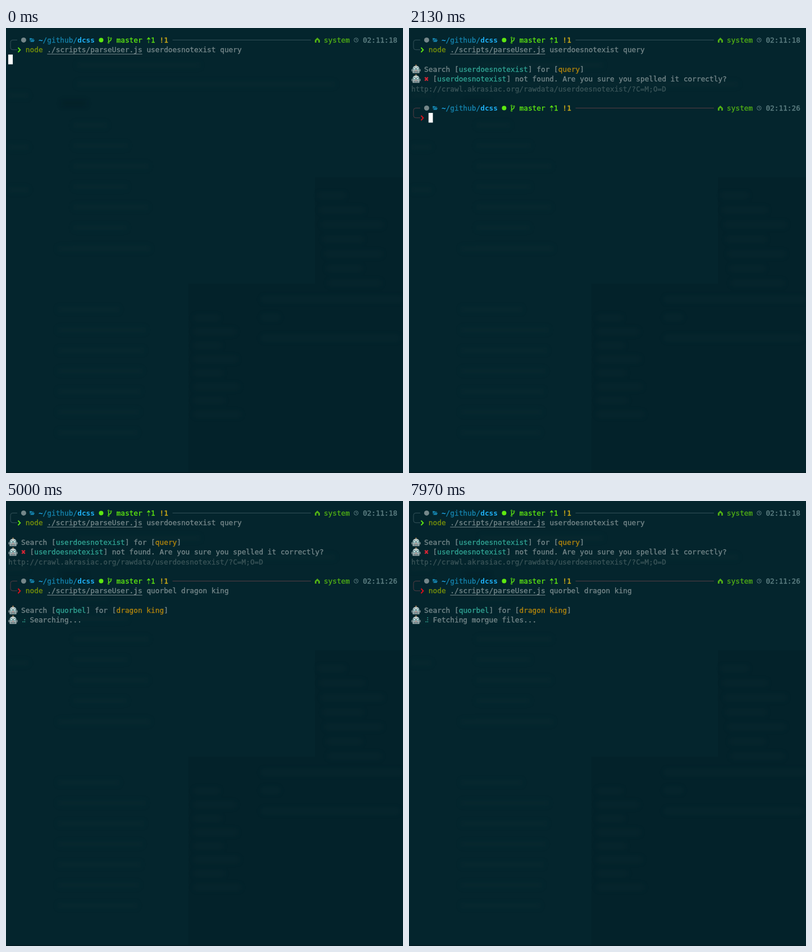
Recreate the animation shown at these times as an HTML page. Size 707 by 792 pixels, loop 8000 ms.

```html
<!DOCTYPE html>
<html lang="en">
<head>
<meta charset="utf-8">
<title>Terminal session</title>
<style>
  html, body { margin: 0; width: 100%; height: 100%; overflow: hidden; background: #04252d; }
  svg { display: block; width: 100%; height: 100%; }
  text { font: 12.79px "DejaVu Sans Mono", "Liberation Mono", monospace; stroke-width: .35; white-space: pre; }
  .bold { font-weight: bold; stroke-width: 0; }
</style>
</head>
<body>
<svg id="stage" viewBox="0 0 707 792" xmlns="http://www.w3.org/2000/svg">
  <defs>
    <filter id="soft" x="-20%" y="-20%" width="140%" height="140%"><feGaussianBlur stdDeviation="5"/></filter>
    <g id="robot">
      <path d="M-7.3 0V4M7.3 0V4" stroke="#8d9da0" stroke-width="1.4"/>
      <path d="M0 -8V-5" stroke="#b98a55" stroke-width="2"/>
      <path d="M-6 7V-1Q-5.5 -6 0 -6Q5.5 -6 6 -1V7Z" fill="#a9b9ba"/>
      <path d="M-5 -2Q-3.5 -5 0 -5Q3.5 -5 5 -2Z" fill="#cad4d3"/>
      <g fill="#d9f1ee" stroke="#3e7379"><circle cx="-2.9" cy="-.6" r="2"/><circle cx="2.9" cy="-.6" r="2"/></g>
      <path d="M-1 3L0 1.2L1 3Z" fill="#c34a43"/>
      <path d="M-4 4.8H4" stroke="#43565c" stroke-width="2"/>
      <path d="M-2 4V5.6M0 4V5.6M2 4V5.6" stroke="#c8d3d3" stroke-width=".8"/>
    </g>
  </defs>
</svg>
<script>
const LOOP = 8000, CELL = 7.7, LINE = 17.3;
const GRAY = '#75878a', DIM = '#3a5458', CYAN = '#30a292', GOLD = '#b1840d', OLIVE = '#76900a',
  LIME = '#5ee811', GREEN = '#50ae15', RED = '#e0101b', SKY = '#1eaef2', BLUE = '#1583ad',
  DARK = '#04252d', TIME = '#5f8084';
const SCRIPT = './scripts/parseUser.js', USER = 'quorbel';

const stage = document.getElementById('stage');
const col = c => 4 + CELL * c;
const row = r => 21.4 + LINE * r;

function add(parent, tag, attrs, content) {
  const node = document.createElementNS('http://www.w3.org/2000/svg', tag);
  for (const key in attrs) node.setAttribute(key, attrs[key]);
  if (content) node.textContent = content;
  return parent.appendChild(node);
}

function write(parent, c, r, content, color, cls = '') {
  add(parent, 'text', { x: col(c), y: row(r) + 4.6, fill: color, stroke: color, class: cls }, content);
}

// Writes [text, color] runs one after another
function runs(parent, c, r, list) {
  for (const [content, color] of list) {
    write(parent, c, r, content, color);
    c += content.length;
  }
}

function block(parent, c, r, cells, color) {
  return add(parent, 'rect', { x: col(c), y: row(r) - 8.7, width: cells * CELL, height: LINE, fill: color });
}

function stroke(parent, d, color, width = 1) {
  add(parent, 'path', { d, fill: 'none', stroke: color, 'stroke-width': width });
}

// Groups are visible during [from, to)
const timed = [];
function group(from = 0, to = LOOP) {
  const node = add(stage, 'g', {});
  timed.push({ node, from, to });
  return node;
}

function backdrop() {
  add(stage, 'rect', { width: 707, height: 792, fill: DARK });
  add(stage, 'path', { d: 'M550 266H707V792H325V455H550Z', fill: '#03222a' });
  const blur = add(stage, 'g', { filter: 'url(#soft)', opacity: .22 });
  const smudge = (x, y, w, fill = '#0b3036') => add(blur, 'rect', { x, y: y - 5, width: w, height: 10, fill });
  smudge(98, 134, 46, '#001016');
  smudge(126, 66, 220);
  smudge(126, 100, 460);
  for (let i = 0; i < 7; i++) smudge(120, 173 + i * 36.5, 60 + (i * 37) % 75);
  for (let i = 0; i < 7; i++) smudge(92, 501 + i * 36.5, 110 + (i * 47) % 50);
  smudge(92, 393, 165);
  for (let i = 0; i < 8; i++) smudge(335, 516 + i * 24.5, 45 + (i * 29) % 55, '#123139');
  for (let i = 0; i < 7; i++) smudge(556 + i * 3, 298 + i * 26, 48 + (i * 31) % 70, '#123139');
  smudge(455, 483, 250, '#17353b');
  smudge(455, 515, 32, '#17353b');
  smudge(455, 552, 245, '#17353b');
  for (const y of [120, 212, 288]) smudge(4, y, 36);
  add(stage, 'rect', { y: 790, width: 707, height: 2, fill: '#031d24' });
}

function prompt(parent, r, clock, lineColor, arrowColor) {
  const y = row(r), icons = add(parent, 'g', { transform: `translate(0 ${y})` });
  stroke(icons, 'M20 0H12Q8 0 8 4V13.3Q8 17.3 12 17.3H20M296.6 0H543', lineColor);
  stroke(icons, 'M21.5 13.4L25.3 17.6L21.5 21.8', arrowColor, 2);
  add(icons, 'circle', { cx: 31.4, cy: 0, r: 4.5, fill: GRAY });
  add(icons, 'path', { d: 'M42 -3.5H45.5L46.5 -2.4H49.5V-1H44.5L42.8 2.5Z M45 -.2H51.2L49.3 3.3H43.2Z', fill: BLUE });
  write(parent, 7, r, '~', SKY, 'bold');
  write(parent, 8, r, '/github/', BLUE);
  write(parent, 16, r, 'dcss', SKY, 'bold');
  add(icons, 'circle', { cx: 169.4, cy: 0, r: 4, fill: LIME });
  stroke(icons, 'M182.6 -3.2V4M187 -2V-1Q187 1.3 182.6 2.5', LIME, 1.4);
  for (const [cx, cy] of [[182.6, -4.2], [187, -3], [182.6, 4.8]])
    add(icons, 'circle', { cx, cy, r: 1.2, fill: DARK, stroke: LIME });
  runs(parent, 25, r, [['master', LIME]]);
  stroke(icons, 'M251.4 -1L254 -4L256.6 -1', LIME, 1.4);
  stroke(icons, 'M254 -3.5V-.3M254 1V2.5M254 3.6V5', LIME, 1.4);
  write(parent, 33, r, '1', LIME);
  write(parent, 35, r, '!1', '#cfac18');
  add(icons, 'path', { d: 'M550 4.5V0L554.5 -4.5L559 0V4.5H556.2V1Q554.5 -1 552.8 1V4.5Z', fill: GREEN });
  write(parent, 73, r, 'system', GREEN);
  add(icons, 'circle', { cx: 623.5, cy: 0, r: 3.7, fill: 'none', stroke: TIME });
  stroke(icons, 'M623.5 -2.2V.3H625.3', TIME);
  write(parent, 82, r, clock, TIME);
}

function underline(parent, r, color) {
  stroke(parent, `M${col(9)} ${row(r) + 7.7}H${col(31)}`, color);
}

function command(parent, r, args) {
  runs(parent, 4, r, [['node ', OLIVE], [SCRIPT + ' ', GRAY], [args, GRAY]]);
  underline(parent, r, GRAY);
}

function robot(parent, r) {
  add(parent, 'use', { href: '#robot', transform: `translate(12.5 ${row(r)})` });
}

function search(from, r, user, query) {
  const g = group(from);
  robot(g, r);
  robot(g, r + 1);
  runs(g, 3, r, [['Search [', GRAY], [user, CYAN], ['] for [', GRAY], [query, GOLD], [']', GRAY]]);
}

// Braille dots 1-6 lit in each spinner step
const STEPS = ['124', '145', '1456', '456', '3456', '356', '236', '1236', '123', '1234'];

function spinner(r, from, to, ticks, firstStep = 0) {
  const g = group(from, to);
  const dots = [0, 1, 2, 3, 4, 5].map(i => add(g, 'rect', {
    x: 29.4 + 3 * Math.floor(i / 3), y: row(r) - 4.8 + 3.6 * (i % 3), width: 1.7, height: 1.7, fill: CYAN
  }));
  return t => {
    const step = STEPS[(firstStep + ticks.filter(tick => t >= tick).length) % 10];
    dots.forEach((dot, i) => dot.setAttribute('opacity', step.includes(i + 1) ? 1 : 0));
  };
}

backdrop();

const first = group();
prompt(first, 0, '02:11:18', '#35535a', LIME);
command(first, 1, 'userdoesnotexist query');
block(group(0, 230), 0, 2, 1.05, '#fff');

search(230, 3, 'userdoesnotexist', 'query');
write(group(230, 1400), 5, 4, 'Searching...', GRAY);

const missing = group(1400);
stroke(missing, `M28.3 ${row(4) - 2.8}l5.4 6m0 -6l-5.4 6`, '#d32535', 2.4);
runs(missing, 5, 4, [['[', GRAY], ['userdoesnotexist', CYAN], ['] not found. Are you sure you spelled it correctly?', GRAY]]);
write(missing, 0, 5, 'http://crawl.akrasiac.org/rawdata/userdoesnotexist/?C=M;O=D', DIM);
block(group(1400, 1930), 0, 6, 1.05, '#fff');

prompt(group(2000), 7, '02:11:26', '#553c43', RED);
block(group(2000, 3400), 4, 8, 1, '#fff');

const args = `${USER} dragon king`;
const pasted = group(3400, 4400);
block(pasted, 4, 8, 4, OLIVE);
block(pasted, 8, 8, 43, GRAY);
block(pasted, 51, 8, 1, '#fff');
write(pasted, 4, 8, `node ${SCRIPT} ${args}`, DARK);
underline(pasted, 8, DARK);

command(group(4400), 8, args);
block(group(4400, 4600), 0, 9, 1.05, '#fff');

search(4600, 10, USER, 'dragon king');
write(group(4600, 5930), 5, 11, 'Searching...', GRAY);
write(group(5930), 5, 11, 'Fetching morgue files...', GRAY);

const spinners = [
  spinner(4, 230, 1400, [600, 930, 1270]),
  spinner(11, 4600, LOOP, [4670, 4730, 4770, 4830, 5000, 5330, 5600, 6130, 6270, 6600, 6930, 7270, 7600, 7930])
];

function render(t) {
  for (const { node, from, to } of timed)
    node.setAttribute('visibility', t >= from && t < to ? 'visible' : 'hidden');
  spinners.forEach(update => update(t));
}

const start = performance.now();
function frame(now) {
  render(Math.max(0, now - start) % LOOP);
  requestAnimationFrame(frame);
}
render(0);
requestAnimationFrame(frame);
</script>
</body>
</html>
```
